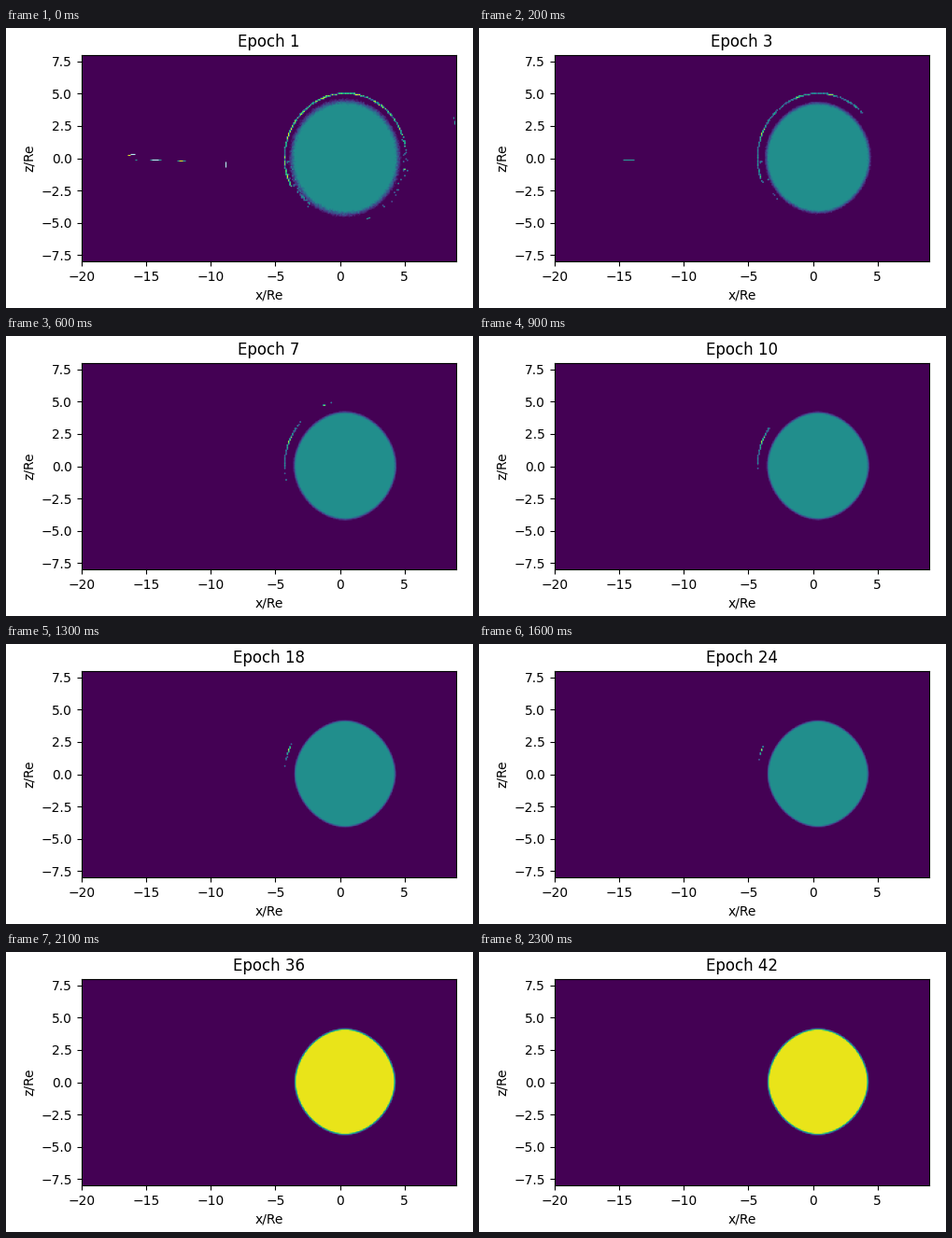
A matplotlib script for the animation above (2400 ms loop, 500 by 300 pixels).

```python
import numpy as np
import matplotlib.pyplot as plt
from matplotlib.animation import FuncAnimation

W, H, DPI = 500, 300, 100
NX, NY = 291, 161
X0, X1, Y0, Y1 = -20, 9, -8, 8
EPOCHS = [*range(1, 11), *range(12, 31, 2), *range(33, 43, 3)]
CX, RX, RY = 0.36, 3.95, 4.18                    # central disc
ARC_X, ARC_RX, ARC_RY = 0.4, 4.71, 5.0           # outer shell

rng = np.random.default_rng(4)
gx, gy = np.meshgrid(np.linspace(X0, X1, NX), np.linspace(Y0, Y1, NY))
dx, dy = abs(gx - CX) / RX, abs(gy) / RY
grain = rng.normal(0, 1, (NY, NX))


def shell_cells(rad, scale=1):
    x = ARC_X + ARC_RX * scale * np.cos(rad)
    y = ARC_RY * scale * np.sin(rad)
    col = np.rint((x - X0) / (X1 - X0) * (NX - 1)).astype(int)
    row = np.rint((y - Y0) / (Y1 - Y0) * (NY - 1)).astype(int)
    return row, col


def bump(a, centre, width):
    return np.exp(-((a - centre) / width) ** 2)


# Shell: each point has a brightness and a last epoch that depend on its angle
angle = np.arange(-35, 207, 0.9)
arc = shell_cells(np.radians(angle))
knots = [-35, 0, 25, 40, 46, 60, 90, 104, 112, 120, 128, 132, 136,
         142, 150, 158, 165, 172, 178, 184, 195, 206]
lives = [0.6, 1.1, 1.6, 3, 4.4, 5.6, 6.2, 6.6, 7.4, 5.6, 4, 2.5, 8,
         11, 19, 30, 26, 21, 17, 8, 7, 1.6]
life = np.interp(angle, knots, lives) * rng.uniform(0.5, 1.1, angle.size)
life[np.argmin(abs(angle - 158))] = 34
life[np.argmin(abs(angle - 155))] = 34
glow = (0.42 + 0.45 * bump(angle, 157, 5) + 0.35 * bump(angle, 108, 4)
        + 0.35 * bump(angle, 77, 4) + rng.normal(0, 0.12, angle.size))
flare = 0.4 * (rng.random(angle.size) < 0.6)

# Loose dust on the lower flanks
dust_a = np.radians(np.r_[rng.uniform(182, 232, 46), rng.uniform(-52, 22, 26)])
dust_r = np.r_[rng.uniform(0.89, 0.97, 46), rng.uniform(0.95, 1.03, 26)]
dust = shell_cells(dust_a, dust_r)
dust_life = np.r_[rng.uniform(0.7, 3.4, 46), rng.uniform(0.7, 1.9, 26)]
dust_glow = rng.uniform(0.25, 0.55, 72)


def field(epoch):
    t = epoch - 1
    halo = 0.07 * np.exp(-t / 1.8) + 0.035 * np.exp(-t / 9)
    power = 1.86 + 0.14 * np.exp(-t / 4)
    radius = (dx ** power + dy ** power) ** (1 / power)
    edge = 1 + halo * (1 + 0.1 * grain)
    disc = np.clip((edge - radius) / (0.04 + 0.7 * halo), 0, 1)
    img = disc * (0.965 if epoch > life.max() else 0.494)
    on = life >= epoch
    level = np.clip(glow + flare * np.exp(-t), 0.25, 1)
    np.maximum.at(img, (arc[0][on], arc[1][on]), level[on])
    on = dust_life >= epoch
    np.maximum.at(img, (dust[0][on], dust[1][on]), dust_glow[on])
    return img


fig = plt.figure(figsize=(W / DPI, H / DPI), dpi=DPI)
ax = fig.add_axes([80.88 / W, 49.75 / H, 401.25 / W, 221.45 / H])
image = ax.imshow(field(1), origin="lower", extent=(X0, X1, Y0, Y1),
                  cmap="viridis", vmin=0, vmax=1, aspect="auto")
ax.set_xticks(range(-20, 6, 5))
ax.set_yticks(np.arange(-7.5, 8, 2.5))
ax.set_xlabel("x/Re")
ax.set_ylabel("z/Re")
title = ax.set_title("Epoch 1")

TEAL, PALE, GOLD = "#2a9d9a", "#b4eef0", "#d8e22a"
# x from, x to, y from, y to, colour, last epoch
STREAKS = [
    (-16.45, -16.2, 0.24, 0.24, GOLD, 1),
    (-16.25, -15.9, 0.3, 0.3, PALE, 1),
    (-15.85, -15.75, -0.12, -0.12, TEAL, 1),
    (-14.75, -13.85, -0.13, -0.13, TEAL, 4),
    (-14.55, -14.1, -0.13, -0.13, PALE, 1),
    (-12.65, -11.95, -0.17, -0.17, TEAL, 2),
    (-12.5, -12.15, -0.17, -0.17, GOLD, 1),
    (-8.83, -8.83, -0.65, -0.28, PALE, 1),
    (8.78, 8.78, 3.05, 3.25, TEAL, 1),
    (8.88, 8.88, 2.65, 2.95, TEAL, 1),
    (2.05, 2.35, -4.7, -4.6, TEAL, 1),
]
streaks = [(ax.plot((a, b), (c, d), color=col, lw=0.8,
                    solid_capstyle="butt")[0], last)
           for a, b, c, d, col, last in STREAKS]
ax.set_xlim(X0, X1)
ax.set_ylim(Y0, Y1)


def draw(i):
    epoch = EPOCHS[i]
    image.set_data(field(epoch))
    title.set_text(f"Epoch {epoch}")
    for line, last in streaks:
        line.set_visible(epoch <= last)
    return [image, title]


anim = FuncAnimation(fig, draw, frames=len(EPOCHS), interval=100,
                     repeat=True, repeat_delay=0)
plt.show()
```
